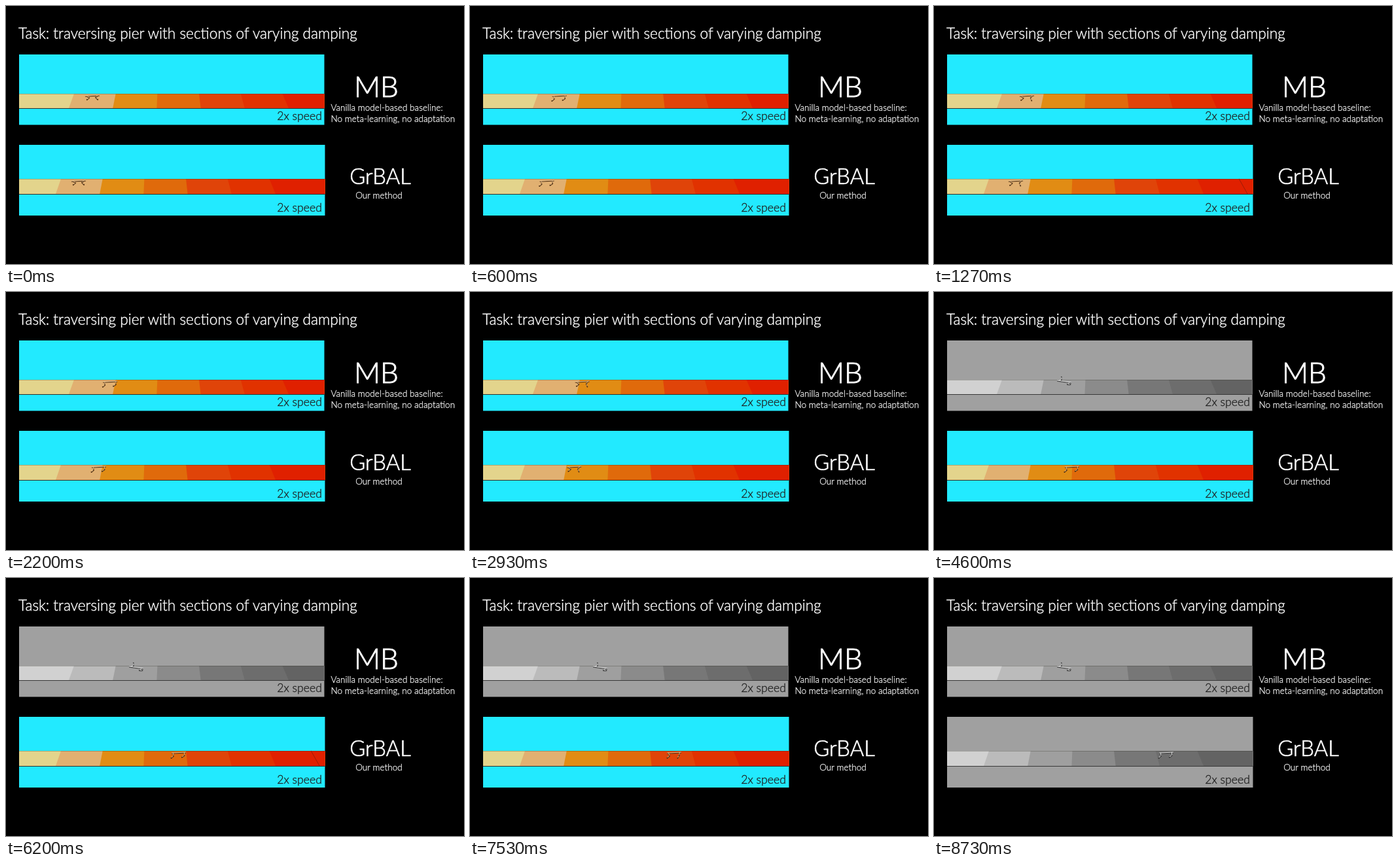
An HTML page with a canvas that plays this animation: 700 px wide and 394 px high, repeating every 8940 ms.

```html
<!DOCTYPE html>
<html lang="en">
<head>
<meta charset="utf-8">
<title>Pier task</title>
<style>
  html, body { margin: 0; width: 100%; height: 100%; overflow: hidden; background: #000; }
  canvas, svg { position: absolute; left: 0; top: 0; width: 700px; height: 394px; }
  text {
    font-family: Lato, "Open Sans", sans-serif; font-weight: 300;
    color: #fff; fill: currentColor; stroke: currentColor; stroke-width: 0.02em;
  }
  .note { font-size: 13.6px; }
  .speed { font-size: 17.7px; color: #202020; text-anchor: end; }
  .mid { text-anchor: middle; }
</style>
</head>
<body>
<canvas id="stage" width="700" height="394"></canvas>
<svg viewBox="0 0 700 394">
  <text x="19" y="50" font-size="22.65">Task: traversing pier with sections of varying damping</text>
  <text class="mid" x="566" y="139" font-size="44.2">MB</text>
  <text class="note" x="496.5" y="159.5">Vanilla model-based baseline:</text>
  <text class="note" x="496.5" y="177.3">No meta-learning, no adaptation</text>
  <text class="speed" x="483" y="174">2x speed</text>
  <text class="mid" x="572" y="272" font-size="32.8">GrBAL</text>
  <text class="note mid" x="570" y="294">Our method</text>
  <text class="speed" x="483" y="314">2x speed</text>
</svg>
<script>
const LOOP = 8.94, FPS = 15;
const ctx = document.getElementById('stage').getContext('2d');

const mix = (a, b, u) => a + (b - a) * u;
const clamp = u => Math.min(1, Math.max(0, u));
const gray = ([r, g, b]) => {
  const v = (0.299 * r + 0.587 * g + 0.114 * b) * 0.9 + 22;
  return [v, v, v];
};

const SLABS = [
  [227, 212, 140], [225, 176, 113], [225, 140, 20], [224, 106, 11],
  [224, 68, 9], [225, 50, 0], [224, 32, 0]
];
const LIVE = { sky: '#22eaff', line: '#30302c', limb: '#553415', body: '#e4bd8c', slabs: SLABS };
const STOPPED = { sky: '#a0a0a0', line: '#383838', limb: '#3c3c3c', body: '#e6e6e6', slabs: SLABS.map(gray) };

// path: [seconds, x] of the runner; the lower pier is the upper one moved left
const panels = [
  { y: 74, w: 466.5, h: 107.5, top: 134, bottom: 156, shift: 0, stop: 4.33, runY: 137,
    path: [[0, 132], [1.27, 142], [4.33, 199]], trips: true },
  { y: 212, w: 467.5, h: 108, top: 264, bottom: 287, shift: -20, stop: 8.6, runY: 267,
    path: [[0, 111], [1.27, 125], [2.2, 142], [3.67, 180], [6.2, 264], [8.6, 355]] }
];

// poses: tilt, rear thigh and shin, front thigh and shin, in degrees
const LEAP = [-29, 60, 180, -130, 0];
const FALLEN = [8, -20, -90, 140, 0];

function runPose(s) {
  const c = Math.cos(2 * Math.PI * s / 0.4);
  return [-3, 60 - 25 * c, 140, 115 + 25 * c, 95 - 50 * c];
}

function along(path, s) {
  const next = path.findIndex(p => p[0] > s);
  if (next < 0) return path[path.length - 1][1];
  const [a, b] = [path[next - 1], path[next]];
  return mix(a[1], b[1], (s - a[0]) / (b[0] - a[0]));
}

function step([x, y], deg, len) {
  const a = deg * Math.PI / 180;
  return [x + Math.cos(a) * len, y + Math.sin(a) * len];
}

function stroke(points, color, width, dy = 0) {
  ctx.beginPath();
  points.forEach(([x, y]) => ctx.lineTo(x, y + dy));
  ctx.strokeStyle = color;
  ctx.lineWidth = width;
  ctx.stroke();
}

function drawRunner(p, s, look) {
  s = Math.min(s, p.stop);
  const leap = p.trips ? Math.exp(-(((s - 3.67) / 0.4) ** 2)) : 0;
  const fall = p.trips ? clamp((s - 3.67) / 0.66) : 0;
  const [tilt, ...legs] = runPose(s).map((v, i) => mix(mix(v, LEAP[i], leap), FALLEN[i], fall));
  const mid = [along(p.path, s), p.runY - 1.5 * leap];
  const hip = step(mid, tilt + 180, 10.5);
  const shoulder = step(mid, tilt, 10.5);
  const leg = (from, thigh, shin) => {
    const knee = step(from, thigh, 4.5);
    return [from, knee, step(knee, shin, 4.5)];
  };
  const rear = leg(step(hip, tilt, 2), legs[0], legs[1]);
  const front = leg(step(shoulder, tilt, -2), legs[2], legs[3]);
  const parts = [[hip, shoulder], rear, front];
  ctx.lineCap = ctx.lineJoin = 'round';
  parts.forEach(part => stroke(part, look.limb, 1.3, 0.6));
  parts.forEach(part => stroke(part, look.body, 0.9, -0.4));
  ctx.fillStyle = look.limb;
  [rear, front].forEach(([, knee, foot]) => [knee, foot].forEach(([x, y]) => {
    ctx.beginPath();
    ctx.arc(x, y, 0.9, 0, 2 * Math.PI);
    ctx.fill();
  }));
}

function drawPanel(p, s) {
  const look = s >= p.stop ? STOPPED : LIVE;
  const left = 20, right = left + p.w;
  const joint = i => [104 + 63.7 * i + p.shift, 96 + 67.2 * i + p.shift];
  ctx.fillStyle = look.sky;
  ctx.fillRect(left, p.y, p.w, p.h);
  look.slabs.forEach((rgb, i) => {
    const [upper, lower] = i ? joint(i - 1) : [left, left];
    ctx.fillStyle = `rgb(${rgb})`;
    ctx.beginPath();
    ctx.moveTo(upper, p.top);
    ctx.lineTo(right, p.top);
    ctx.lineTo(right, p.bottom);
    ctx.lineTo(lower, p.bottom);
    ctx.fill();
  });
  ctx.fillStyle = 'rgba(40, 40, 30, 0.35)';
  ctx.fillRect(left, p.top, p.w, 0.8);
  ctx.fillStyle = look.line;
  ctx.fillRect(left, p.bottom, p.w, 1);
  // the seam at the far end shows only now and then
  const [upper, lower] = joint(6);
  if (lower < right && look === LIVE && (s + 1.7) % 2.45 < 1.15) {
    stroke([[upper, p.top], [lower, p.bottom]], '#8c1c08', 0.8);
  }
  drawRunner(p, s, look);
}

function draw(seconds) {
  const s = Math.floor((seconds % LOOP) * FPS) / FPS;
  ctx.fillStyle = '#000';
  ctx.fillRect(0, 0, 700, 394);
  panels.forEach(p => drawPanel(p, s));
}

const start = performance.now();
function tick() {
  draw((performance.now() - start) / 1000);
  requestAnimationFrame(tick);
}
tick();
</script>
</body>
</html>
```
